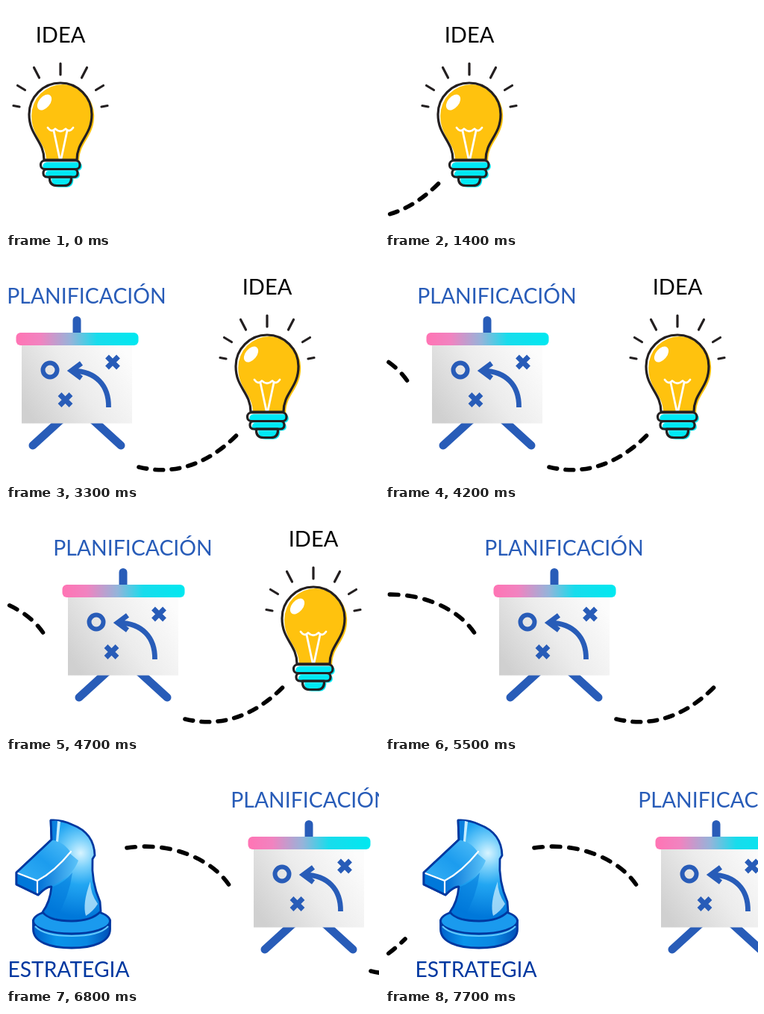
Animation, 500 px wide and 300 px high, one loop 8000 ms. Source, as an HTML page:

```html
<!DOCTYPE html>
<html lang="es">
<head>
<meta charset="utf-8">
<title>Idea, planificación, estrategia</title>
<style>
  html, body { margin: 0; width: 100%; height: 100%; overflow: hidden; background: #fff; }
  svg { display: block; width: 100vw; height: 100vh; }
  text { font-family: Lato, sans-serif; text-anchor: middle; }
  .trail { fill: none; stroke: #000; stroke-width: 5.6; stroke-linecap: round; stroke-dasharray: 11 11.6; }
  .ink { fill: none; stroke: #231f20; stroke-width: 3.2; stroke-linecap: round; stroke-linejoin: round; }
  .blue { fill: none; stroke: #285cb8; }
  .navy { stroke: #0038a0; stroke-width: 2.8; stroke-linejoin: round; }
</style>
</head>
<body>
<svg viewBox="0 0 500 300">
  <defs>
    <linearGradient id="bar">
      <stop offset="0" stop-color="#ff74b4"/>
      <stop offset=".2" stop-color="#f183c0"/>
      <stop offset=".45" stop-color="#94b4da"/>
      <stop offset=".66" stop-color="#18dcec"/>
      <stop offset="1" stop-color="#00e8f0"/>
    </linearGradient>
    <linearGradient id="sheet" x1="0" y1=".75" x2="1" y2=".25">
      <stop offset="0" stop-color="#d0d0d0"/>
      <stop offset=".5" stop-color="#ececec"/>
      <stop offset="1" stop-color="#fcfcfc"/>
    </linearGradient>
    <radialGradient id="neck" gradientUnits="userSpaceOnUse" cx="101" cy="122" r="85">
      <stop offset="0" stop-color="#d8f4ff"/>
      <stop offset=".22" stop-color="#7dd2fb"/>
      <stop offset=".5" stop-color="#22a6f2"/>
      <stop offset="1" stop-color="#0078da"/>
    </radialGradient>
    <linearGradient id="nose" x1="0" y1="1" x2="1" y2="0">
      <stop offset="0" stop-color="#35b0f5"/>
      <stop offset=".5" stop-color="#1c9cee"/>
      <stop offset="1" stop-color="#4fbdf8"/>
    </linearGradient>
    <linearGradient id="muzzle">
      <stop offset="0" stop-color="#0070d6"/>
      <stop offset="1" stop-color="#5cc4f9"/>
    </linearGradient>
    <linearGradient id="plinth">
      <stop offset="0" stop-color="#0062cc"/>
      <stop offset=".3" stop-color="#0a94ea"/>
      <stop offset=".7" stop-color="#0a88e2"/>
      <stop offset="1" stop-color="#0050b8"/>
    </linearGradient>
    <path id="glass" d="M51 206C51 180 31 174 31 145A42 42 0 0 1 115 145C115 174 95 180 95 206Z"/>
    <g id="socket">
      <rect x="46.500" y="207" width="52.500" height="11.500" rx="5.500"/>
      <rect x="50" y="218.500" width="46" height="10.500" rx="5"/>
      <path d="M58.500 229H87.500V231Q87.500 240.500 78 240.500H68Q58.500 240.500 58.500 231Z"/>
    </g>
    <path id="cross" d="M-7.500 -7.500L7.500 7.500M7.500 -7.500L-7.500 7.500"/>
  </defs>

  <g id="scene">
    <g id="bulb">
      <text x="73" y="49" font-size="29">IDEA</text>
      <path class="ink" d="M73 77V92M37.500 82.500L44.500 96M108.500 82.500L101.500 96M15.500 106.500L25.500 112.500M130.500 106.500L120.500 112.500M10 133.500L18 135M136 133.500L128 135"/>
      <use href="#glass" fill="#ffc20e" x="3.200" y="2"/>
      <use href="#socket" fill="#00e9f5" x="2.800" y="2.200"/>
      <ellipse cx="51.500" cy="129" rx="7.500" ry="12" fill="#fff" transform="rotate(40 51.500 129)"/>
      <path d="M56 163Q61 170 66 164.500Q73 171 80 164.500Q85 170 90 163M64 167L72 204.500H74L82 167" fill="none" stroke="#fff" stroke-width="2.800" stroke-linecap="round" stroke-linejoin="round"/>
      <use href="#glass" class="ink"/>
      <use href="#socket" class="ink"/>
    </g>

    <g transform="translate(-409)">
      <path id="firstTrail" class="trail" pathLength="146.6" d="M440.500 238C400 278 356 291 310 280"/>
      <text id="planLabel" x="240" y="61" font-size="28.400" fill="#285cb8">PLANIFICACIÓN</text>
      <path class="blue" stroke-width="11" stroke-linecap="round" d="M227 83.500V105M213 210L168 251M241 210L286 251"/>
      <rect x="153" y="112" width="148" height="109.500" fill="url(#sheet)"/>
      <rect x="145.500" y="100" width="164" height="17" rx="6" fill="url(#bar)"/>
      <g class="blue" stroke-width="6.800">
        <circle cx="191" cy="150" r="9.500" stroke-width="6"/>
        <use href="#cross" x="275" y="139.500"/>
        <use href="#cross" x="211.500" y="190"/>
        <path d="M269.500 200C270 170 252 152 222 151M233 141L219.500 151L233 161"/>
      </g>
    </g>

    <g transform="translate(-589)">
      <path class="trail" pathLength="146.6" d="M299.500 164C277 131 223 106 163 115"/>
      <g class="navy">
        <path fill="url(#plinth)" d="M37.500 212V224C37.500 241 60 249 89 249S140.500 241 140.500 224V212Z"/>
        <ellipse cx="89" cy="213" rx="51.500" ry="17" fill="#1a9aee"/>
        <path fill="url(#neck)" d="M61 78Q75 77 90 84Q119 95 120 125L117 130Q115 160 127 187L128 200Q116 213 89 213Q60 213 50 201Q60 188 62 167Q56 166 44 178L15 164V148L62 104Z"/>
      </g>
      <path fill="url(#muzzle)" d="M43 159Q66 146 86 122L98 132Q90 154 62 166L44 177Z"/>
      <path fill="#0078da" opacity=".55" d="M64 167Q80 161 90 148Q86 180 68 210Q55 207 52 201Q62 188 64 167Z"/>
      <path fill="#c8efff" opacity=".75" d="M114 160Q114 176 124 190Q118 200 108 206Q103 190 114 160Z"/>
      <path fill="url(#nose)" d="M16 148L62 105Q76 105 87 120Q66 145 43 159Z"/>
      <path fill="#0078da" d="M16 149L43 160V176L16 163Z"/>
      <path fill="#0a80de" d="M62 79Q68 78 71 79L70 106L62 104Z"/>
      <path fill="#c4edff" d="M70 79L74 80L71 107L68 106Z"/>
      <path fill="none" stroke="#fff" stroke-width="2.200" stroke-linecap="round" d="M17 149L43 159Q66 147 88 120M43 160V175"/>
      <path fill="none" stroke="#62c8fb" stroke-width="2" d="M40 220Q52 233 89 233Q126 233 138 220"/>
      <path class="navy" fill="none" d="M61 78L62 104L15 148V164L44 178Q56 166 62 167"/>
      <text x="85" y="287.500" font-size="28.200" fill="#0038a0">ESTRATEGIA</text>
    </g>

    <path class="trail" transform="translate(-626)" d="M27 237Q10 254 -12 268" stroke-dashoffset="4"/>
  </g>
</svg>

<script>
  const LOOP = 8000;
  const BULB_LEAVES = 5500;
  const LABEL_SLIPS = 6800;

  // [start in ms, scroll in px]: the scene pans right in held steps, slowing near each stop.
  const steps = [
    [0, 0], [1100, 18], [1400, 40], [1700, 65], [2000, 88], [2300, 117],
    [2600, 178], [2900, 244], [3300, 277], [3700, 302], [4200, 319],
    [4700, 339], [5100, 361], [5500, 409], [5800, 439], [6100, 478],
    [6400, 538], [6800, 588], [7200, 607], [7700, 626]
  ];

  const [scene, bulb, planLabel, firstTrail] =
    ['scene', 'bulb', 'planLabel', 'firstTrail'].map(id => document.getElementById(id));

  const show = (element, visible) => element.style.visibility = visible ? 'visible' : 'hidden';
  const shift = (element, x) => element.setAttribute('transform', `translate(${x})`);

  // The first trail grows dash by dash before the pan begins.
  function growTrail(time) {
    const dashes = time < 500 ? 0 : time < 800 ? 1 : time < 1100 ? 2 : 7;
    show(firstTrail, dashes > 0);
    firstTrail.style.strokeDasharray = '11 11.6 '.repeat(Math.max(dashes - 1, 0)) + '11 999';
  }

  function draw() {
    const time = performance.now() % LOOP;
    shift(scene, steps.filter(([start]) => start <= time).pop()[1]);
    shift(planLabel, time < LABEL_SLIPS ? 0 : -11);
    show(bulb, time < BULB_LEAVES);
    growTrail(time);
    requestAnimationFrame(draw);
  }
  draw();
</script>
</body>
</html>
```
